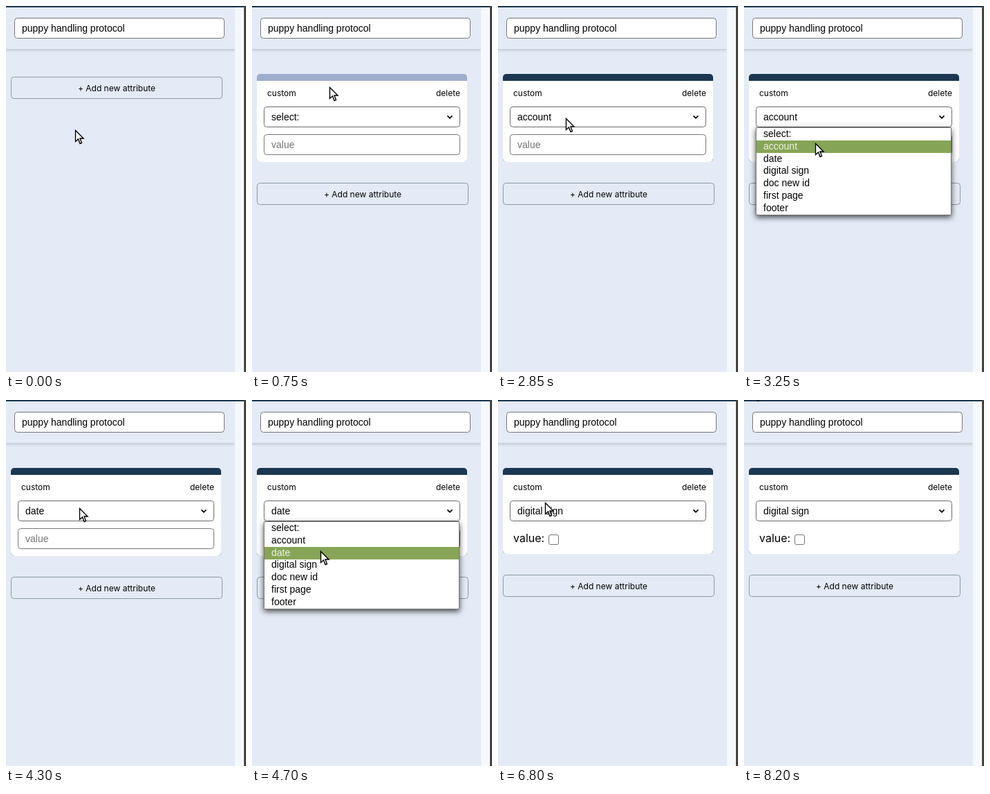
Animation of 347 by 528 pixels, one loop 8.3 s. Source, as an HTML page with a canvas:

```html
<!DOCTYPE html>
<html lang="en">
<head>
<meta charset="utf-8">
<title>Attribute form</title>
<style>
  html, body { margin: 0; width: 100%; height: 100%; overflow: hidden; background: #e4ebf6; }
  canvas { display: block; }
</style>
</head>
<body>
<canvas id="stage" width="347" height="528"></canvas>
<script>
const ctx = document.getElementById('stage').getContext('2d', { alpha: false });
const LOOP = 8300, TICK = 50;
const BG = '#e4ebf6', NAVY = '#1c3751', LINE = '#767676';
const SANS = '14px "Liberation Sans", Arial, sans-serif';
const INTER = '12px Inter, sans-serif';
const INTER_BIG = '16px Inter, sans-serif';

const options = ['select:', 'account', 'date', 'digital sign', 'doc new id', 'first page', 'footer'];
const LIST_TOP = 176, ROW = 17.8;

// each time the list opens and shuts, the next option gets chosen
const menus = [[1600, 2200], [3050, 3700], [4450, 5050]];

// pointer moves: begin, end, x, y; it rests between them
const home = [100, 179];
const moves = [
  [200, 450, 112, 117],
  [950, 1300, 102, 165],
  [1700, 2050, 88, 206],
  [2600, 2900, 98, 161],
  [3000, 3550, 105, 214],
  [3800, 4300, 106, 156],
  [4400, 4650, 104, 202],
  [4650, 4850, 93, 239],
  [5400, 5750, 84, 204],
  [6100, 6200, 84, 192],
  [6300, 6550, 100, 165],
  [6550, 7150, 51, 139],
  [7500, 8000, 2, 20],
  [8000, 8200, 13, -18]
];

const easeOut = k => 1 - (1 - k) ** 2;

function pointerAt(t) {
  let [x, y] = home;
  for (const [begin, end, toX, toY] of moves) {
    if (t <= begin) break;
    const k = easeOut(Math.min(1, (t - begin) / (end - begin)));
    x += (toX - x) * k;
    y += (toY - y) * k;
  }
  return [Math.round(x), Math.round(y)];
}

function rect(x, y, w, h, color) {
  ctx.fillStyle = color;
  ctx.fillRect(x, y, w, h);
}

function round(x, y, w, h, r, color) {
  ctx.beginPath();
  ctx.roundRect(x, y, w, h, r);
  ctx.fillStyle = color;
  ctx.fill();
}

function stroke(width, color) {
  ctx.lineWidth = width;
  ctx.strokeStyle = color;
  ctx.stroke();
}

function box(x, y, w, h, r, fill = '#fff', line = LINE) {
  round(x + .5, y + .5, w - 1, h - 1, r, fill);
  stroke(1, line);
}

function text(str, x, y, font = SANS, color = '#000', align = 'left') {
  ctx.font = font;
  ctx.fillStyle = color;
  ctx.textAlign = align;
  ctx.fillText(str, x, y);
}

function shadowed(blur, dy, color, draw) {
  ctx.save();
  ctx.shadowBlur = blur;
  ctx.shadowOffsetY = dy;
  ctx.shadowColor = color;
  draw();
  ctx.restore();
}

function drawPage() {
  rect(0, 0, 347, 528, BG);
  shadowed(4, 2, 'rgba(0,0,0,.16)', () => rect(-10, 0, 341, 62, BG));
  rect(331, 0, 13, 528, '#f5f9fe');
  rect(344, 0, 3, 528, '#45433a');
  rect(0, 0, 344, 2, NAVY);
  box(12, 17, 304, 30, 4);
  text('puppy handling protocol', 23, 37);
}

function drawButton(y) {
  box(7, y, 306, 32, 4, BG, '#8b98a9');
  text('+ Add new attribute', 160, y + 21, INTER, '#000', 'center');
}

function drawCard(t, chosen, asCheck, overCheck) {
  const h = asCheck ? 124 : 127;
  round(7, 98, 304, h, 5, t < 1550 ? '#9fadce' : NAVY);
  round(7, 108, 304, h - 10, [0, 0, 5.5, 5.5], '#fff');
  text('custom', 22, 130, INTER);
  text('delete', 301, 130, INTER, '#000', 'right');

  box(17, 145, 284, 30, 4, '#fff', '#6a6a6a');
  text(options[chosen], 28, 165);
  ctx.beginPath();
  ctx.moveTo(282.5, 158.3);
  ctx.lineTo(286, 161.8);
  ctx.lineTo(289.5, 158.3);
  stroke(1.8, '#000');

  if (asCheck) {
    text('value:', 22, 205, INTER_BIG);
    box(73, 194, 15, 15, 2.5, '#fff', overCheck ? '#4f4f4f' : LINE);
  } else {
    box(17, 185, 284, 30, 4);
    text('value', 28, 205, SANS, '#757575');
  }
}

function drawList(active) {
  shadowed(8, 3, 'rgba(0,0,0,.7)', () => rect(17, 175, 283, 127, '#fff'));
  box(17, 175, 283, 127, 0);
  rect(18, Math.round(LIST_TOP + active * ROW), 281, 18, '#87a556');
  options.forEach((name, i) =>
    text(name, 28, Math.round(189 + i * ROW), SANS, i === active ? '#eef2e4' : '#000'));
}

function drawPointer(x, y) {
  const shape = [[0, 0], [0, 16], [4, 12.5], [6.5, 19], [9, 18], [6.5, 11.5], [11.5, 11.5]];
  ctx.beginPath();
  shape.forEach(([dx, dy]) => ctx.lineTo(x + dx + .5, y + dy + .5));
  ctx.closePath();
  ctx.fillStyle = '#fff';
  ctx.fill();
  stroke(1.4, '#000');
}

function draw(time) {
  const t = Math.floor(time % LOOP / TICK) * TICK;
  const [x, y] = pointerAt(t);
  const chosen = menus.filter(([, shut]) => t >= shut).length;
  const asCheck = t >= 5100;

  drawPage();
  drawButton(t < 750 ? 102 : asCheck ? 252 : 255);
  if (t >= 750) drawCard(t, chosen, asCheck, x >= 73 && x < 88 && y >= 192 && y < 209);
  if (menus.some(([open, shut]) => t >= open && t < shut)) {
    drawList(y < LIST_TOP ? chosen : Math.floor((y - LIST_TOP) / ROW));
  }
  drawPointer(x, y);
}

let start;
function frame(now) {
  start ??= now;
  draw(now - start);
  requestAnimationFrame(frame);
}
requestAnimationFrame(frame);
</script>
</body>
</html>
```
